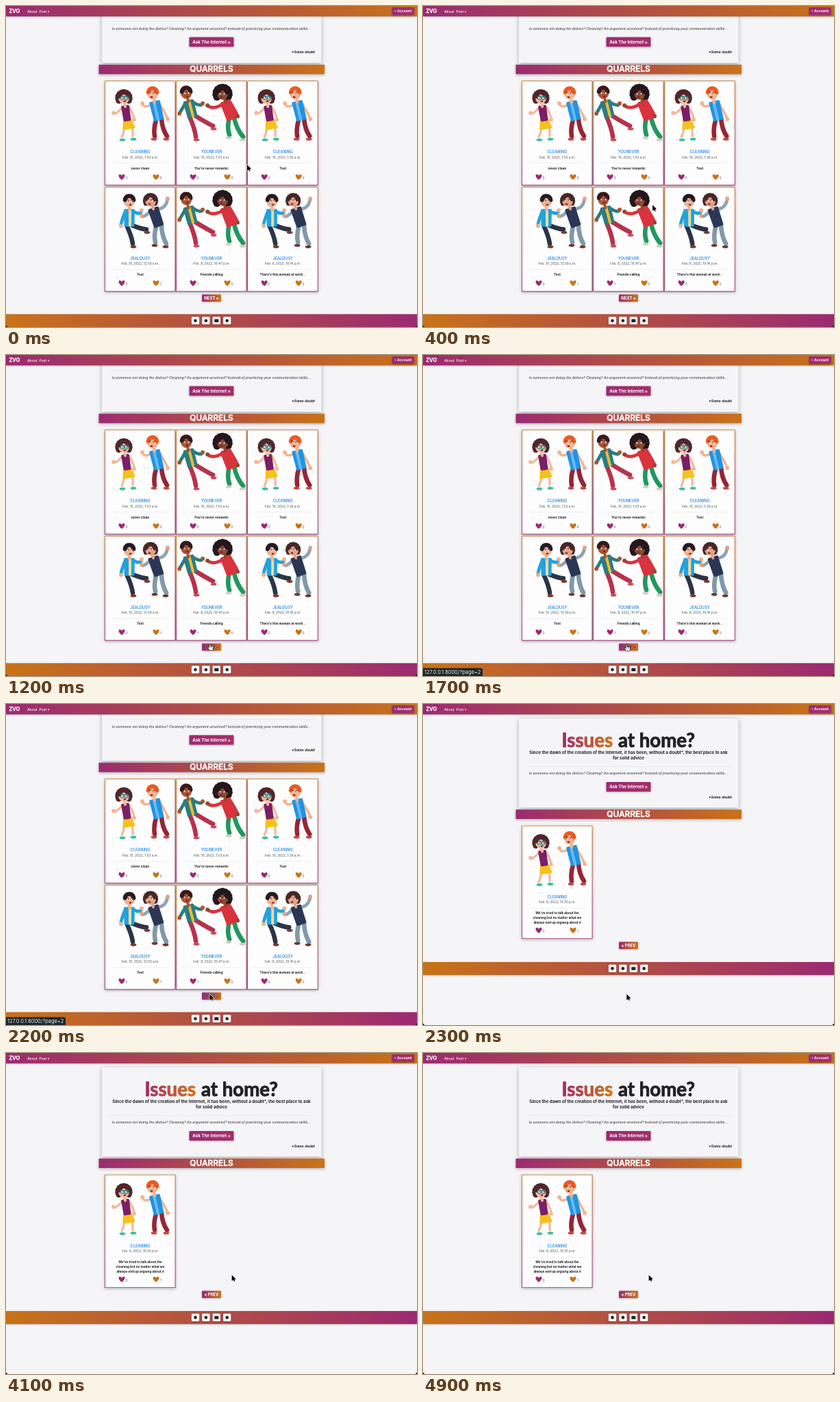
Recreate the animation shown at these times as an HTML page with a canvas. Size 600x469 px, loop 5 s.

```html
<!DOCTYPE html>
<html lang="en">
<head>
<meta charset="utf-8">
<title>Quarrels</title>
<style>
html, body { margin: 0; width: 100%; height: 100%; overflow: hidden; background: #f5f4f7; }
canvas { display: block; width: 600px; height: 469px; }
</style>
</head>
<body>
<canvas id="stage"></canvas>
<script>
const W = 600, H = 469, LOOP = 5000, STEP = 100;
const PURPLE = '#9b2a72', ORANGE = '#c87318', INK = '#212226', LINK = '#147fe6', GREY = '#62666c';
const SANS = 'Inter, "Open Sans", sans-serif';
const canvas = document.getElementById('stage');
const ctx = canvas.getContext('2d');
const dpr = window.devicePixelRatio || 1;
canvas.width = W * dpr;
canvas.height = H * dpr;

// Basic drawing
function text(str, x, y, font, color, align = 'center', family = SANS) {
  ctx.font = `${font} ${family}`;
  ctx.textAlign = align;
  ctx.fillStyle = color;
  ctx.fillText(str, x, y);
}

// Text with a round outline, for soft corners
function roundText(str, x, y, font, color, align, weight, family) {
  text(str, x, y, font, color, align, family);
  ctx.lineJoin = 'round';
  ctx.lineWidth = weight;
  ctx.strokeStyle = color;
  ctx.strokeText(str, x, y);
}

function fade(x0, y0, x1, y1, from = PURPLE, to = ORANGE) {
  const g = ctx.createLinearGradient(x0, y0, x1, y1);
  g.addColorStop(0, from);
  g.addColorStop(1, to);
  return g;
}

function box(x, y, w, h, fill, r = 0, shadow = 0) {
  ctx.save();
  if (shadow) {
    ctx.shadowColor = 'rgba(0,0,0,.3)';
    ctx.shadowBlur = shadow * dpr;
    ctx.shadowOffsetY = shadow * 0.3 * dpr;
  }
  ctx.fillStyle = fill;
  ctx.beginPath();
  ctx.roundRect(x, y, w, h, r);
  ctx.fill();
  ctx.restore();
}

function oval(color, [x, y], rx, ry = rx, turn = 0) {
  ctx.fillStyle = color;
  ctx.beginPath();
  ctx.ellipse(x, y, rx, ry, turn, 0, 7);
  ctx.fill();
}

function line(color, width, from, to, bend = from) {
  ctx.strokeStyle = color;
  ctx.lineWidth = width;
  ctx.lineCap = 'round';
  ctx.beginPath();
  ctx.moveTo(...from);
  ctx.quadraticCurveTo(...bend, ...to);
  ctx.stroke();
}

function shape(color, points, edge = 0) {
  ctx.fillStyle = ctx.strokeStyle = color;
  ctx.lineWidth = edge;
  ctx.lineJoin = 'round';
  ctx.beginPath();
  points.forEach(p => ctx.lineTo(...p));
  ctx.closePath();
  ctx.fill();
  if (edge) ctx.stroke();
}

function heart(x, y, color) {
  ctx.fillStyle = color;
  ctx.beginPath();
  for (const k of [-1, 1]) {
    ctx.moveTo(x, y - 2.2);
    ctx.bezierCurveTo(x + k * 3, y - 6.6, x + k * 8.4, y - 2.4, x, y + 4.2);
  }
  ctx.fill();
}

const mix = (a, b, u) => a.map((v, i) => v + (b[i] - v) * u);

// People: a spine from head to hip, with curved limbs to the hands and feet
function scowl([x, y], side) {
  for (const k of [-1, 1]) {
    const ex = x + k * 3 + side;
    oval('#fff', [ex, y], 1.5, 1.2);
    oval('#3a1c1a', [ex + side * 0.5, y], 0.7);
    line('#3a1c1a', 0.9, [ex - k * 1.4, y - 1.4], [ex + k * 1.8, y - 2.7]);
  }
  oval('#7d1f25', [x + side * 1.5, y + 5], 2, 1.1, -side * 0.2);
}

function curls(color, [x, y], reach, size, spread) {
  for (let i = 0; i <= 10; i++) {
    const a = Math.PI / 2 + (i / 5 - 1) * spread;
    oval(color, [x + reach * Math.cos(a), y - reach * Math.sin(a)], size);
  }
}

function person({ head, hip, hands, feet, side, skin, hair, mane = 0, top, inner, sleeve, legs, shoe, skirt, glasses }) {
  const dx = hip[0] - head[0], dy = hip[1] - head[1], len = Math.hypot(dx, dy);
  const spine = (down, out = 0) =>
    [head[0] + (dx * down + dy * out) / len, head[1] + (dy * down - dx * out) / len];

  if (mane) curls(hair, head, 4 + mane, mane, 2.1);
  feet.forEach((foot, i) => {
    const from = spine(len, i ? 4 : -4), knee = mix(from, foot, 0.5);
    knee[0] += side * 3;
    line(legs, skirt ? 3.2 : 6.6, from, [foot[0], foot[1] - 5], knee);
    oval(shoe, [foot[0] + side, foot[1] - 0.6], 4.4, 2.1);
  });
  if (skirt) shape(skirt, [spine(len - 2, -5), spine(len - 2, 5), spine(len + 13, 9), spine(len + 13, -8)], 1.5);

  hands.forEach((hand, i) => {
    const from = spine(15, i ? 6 : -6), elbow = mix(from, hand, 0.5);
    elbow[0] += i ? 5 : -4;
    elbow[1] += 7;
    line(sleeve || skin, sleeve ? 4.8 : 3.4, from, hand, elbow);
    oval(skin, hand, 2.9);
  });
  const half = skirt ? 4 : 6;
  shape(top, [spine(13, -half), spine(13, half), spine(len, half - 0.5), spine(len, 0.5 - half)], 4);
  if (inner) line(inner, 4, spine(13, side), spine(len, side));

  line(skin, 4, spine(5), spine(13));
  oval(skin, head, 7.9, 8.7, -Math.atan2(dx, dy));
  curls(hair, [head[0], head[1] - 1.5], 6.4, 3, 1.5);
  scowl(head, side);
  if (glasses) for (const k of [-3, 3]) {
    ctx.strokeStyle = glasses;
    ctx.lineWidth = 1.1;
    ctx.beginPath();
    ctx.arc(head[0] + side + k, head[1], 2.7, 0, 7);
    ctx.stroke();
  }
}

const cleaning = [
  { head: [28, 25], hip: [33, 57], hands: [[13, 47], [43, 57]], feet: [[25, 87], [41, 86]], side: 1,
    skin: '#f4b89c', hair: '#51272c', mane: 4.4, top: '#7b1f67', legs: '#f4b89c', shoe: '#3fbf9a',
    skirt: '#f6c11c', glasses: '#24959c' },
  { head: [70, 19], hip: [79, 56], hands: [[55, 33], [92, 56]], feet: [[73, 86], [91, 86]], side: -1,
    skin: '#f5b28e', hair: '#ea5b22', top: '#2094e4', inner: '#6db9ee', legs: '#962536', shoe: '#c9473f' }
];
const romance = [
  { head: [15, 18], hip: [24, 52], hands: [[5, 48], [39, 33]], feet: [[29, 87], [54, 71]], side: 1,
    skin: '#a85530', hair: '#38191d', top: '#2b7c83', inner: '#f1bb35', sleeve: '#2b7c83', legs: '#b7324c', shoe: '#c5505a' },
  { head: [68, 19], hip: [81, 55], hands: [[46, 36], [90, 52]], feet: [[78, 84], [98, 87]], side: -1,
    skin: '#8d4930', hair: '#25171d', mane: 5.4, top: '#d9333e', sleeve: '#d9333e', legs: '#20985c', shoe: '#d8c9c6' }
];
const jealousy = [
  { head: [36, 21], hip: [36, 56], hands: [[24, 57], [54, 34]], feet: [[41, 88], [61, 67]], side: 1,
    skin: '#f0b18f', hair: '#241b24', top: '#22a2dc', inner: '#f0d9a0', sleeve: '#22a2dc', legs: '#2c3445', shoe: '#7c3b2d' },
  { head: [67, 20], hip: [79, 56], hands: [[54, 42], [92, 17]], feet: [[74, 86], [90, 88]], side: -1,
    skin: '#e6a184', hair: '#47282a', mane: 3.6, top: '#2b3655', sleeve: '#8fa4b2', legs: '#7f99aa', shoe: '#70382e' }
];

// Page parts
const posts = [
  [cleaning, 'CLEANING', 'Feb. 10, 2022, 1:53 a.m.', ['never clean'], 0, 0],
  [romance, 'YOUNEVER', 'Feb. 10, 2022, 1:53 a.m.', ["You're never romantic"], 0, 0],
  [cleaning, 'CLEANING', 'Feb. 10, 2022, 1:36 a.m.', ['Test'], 0, 0],
  [jealousy, 'JEALOUSY', 'Feb. 10, 2022, 12:59 a.m.', ['Test'], 0, 1],
  [romance, 'YOUNEVER', 'Feb. 8, 2022, 10:47 p.m.', ['Friends calling'], 1, 0],
  [jealousy, 'JEALOUSY', 'Feb. 8, 2022, 10:41 p.m.', ["There's this woman at work..."], 0, 0]
];
const lastPost = [cleaning, 'CLEANING', 'Feb. 8, 2022, 10:35 p.m.',
  ["We've tried to talk about the", 'cleaning but no matter what we', 'always end up arguing about it'], 0, 1];

function card([people, title, date, lines, likes, hates], x, y) {
  const h = 153 + (lines.length - 1) * 6.2, cx = 52, hy = h - 12.3;
  ctx.save();
  ctx.translate(x, y);
  box(0, 0, 103.5, h, fade(30, 0, 60, h, ORANGE, PURPLE), 0.5, 4);
  box(0.9, 0.9, 101.7, h - 1.8, '#fdfdfe');
  people.forEach(person);
  text(title, cx, 106.2, '500 5.6px', LINK);
  text(date, cx, 113.7, '500 4.65px', GREY);
  box(8, 120.3, 87, 0.5, '#e4e4e8');
  lines.forEach((str, i) => text(str, cx, 129.3 + i * 6.9, '700 4.65px', INK));
  [[likes, PURPLE], [hates, ORANGE]].forEach(([count, color], i) => {
    heart(25 + i * 50, hy, color);
    text(count, 32 + i * 50, hy + 3, '400 5px', GREY);
  });
  ctx.restore();
}

function button(x, y, w, h) {
  box(x, y, w, h, fade(x, 0, x + w, 0, '#9c2a73', '#a52f69'), 1.2, 3);
}

function intro() {
  const title = '700 27.6px', lato = 'Lato, sans-serif';
  box(140, 21, 320.5, 130.5, '#f5f5f7', 1, 6);
  roundText('Issues', 202.5, 62.5, title, fade(203, 0, 280, 0, '#a32c6c', '#cd7b19'), 'left', 0.9, lato);
  roundText('at home?', 397, 62.5, title, INK, 'right', 0.9, lato);
  text('Since the dawn of the creation of the Internet, it has been, without a doubt*, the best place to ask',
    300, 73, '700 6.15px', INK);
  text('for solid advice', 300, 81.3, '700 6.15px', INK);
  box(150, 91, 300, 0.5, '#e2e2e6');
  text('Is someone not doing the dishes? Cleaning? An argument unsolved? Instead of practicing your communication skills...',
    300, 103, 'italic 600 5.08px', '#5b5d63');
  button(267.5, 114, 65, 14);
  text('Ask The Internet »', 300, 123.1, '700 6.2px', '#fff');
  text('*Some doubt', 451, 137.7, 'italic 700 5.2px', INK, 'right');
  box(135.5, 154.3, 329.5, 13.8, fade(135, 154, 465, 168), 0.5, 4);
  roundText('QUARRELS', 300, 164.9, '600 11.9px', '#fff', 'center', 0.4);
}

function pager(label, y, hover) {
  box(286, y, 28, 10.6, fade(288, y, 312, y + 8), 1, 2.5);
  text(label, 300, y + 7.6, '700 5.9px', hover ? '#44509f' : '#fff');
}

function footer(y) {
  box(0, y, W, 19, fade(0, y, W, y + 19, ORANGE, PURPLE), 0, 3);
  for (let i = 0; i < 4; i++) {
    const x = 276.5 + i * 15.4, cy = y + 9.4;
    box(x - 5.7, cy - 5.6, 11.4, 11.2, '#f8f7f8', 1.4, 2.5);
    if (i === 2) box(x - 3, cy - 2.2, 6, 4.6, INK, 0.6);
    else oval(INK, [x, cy], 2.3);
  }
}

function navbar() {
  box(0, 0, W, 15.2, fade(0, 0, W, 15), 0, 3);
  roundText('ZVO', 4.5, 10.3, '600 7.4px', '#fff', 'left', 0.3);
  text('About', 31, 9.6, '500 5px', '#fff', 'left');
  text('Post »', 48.5, 9.6, '500 5px', '#fff', 'left');
  button(563.5, 2, 32.5, 11);
  text('‹', 568.2, 9.3, '700 5.2px', '#fff');
  text('Account', 592, 9.4, '700 5.1px', '#fff', 'right');
}

function statusBar() {
  box(0, 457.5, 87, 12, '#1a272b', [0, 2, 0, 0]);
  text('127.0.0.1:8000/?page=2', 2, 466.4, '400 7.4px', '#eef2f3', 'left');
}

// Pointers: each is drawn wide for the outline, then again on top
function arrow() {
  for (const [color, edge] of [['#fff', 1.2], ['#050505', 0.1]]) {
    shape(color, [[0, 0], [0, 8.2], [5.8, 5.7]], edge);
    line(color, 1.4 + edge, [2.4, 5.5], [3.8, 8.6]);
  }
}

function hand() {
  for (const [color, edge] of [['#111', 1.1], ['#fff', 0]]) {
    for (let i = 0; i < 4; i++) line(color, 1.2 + edge, [i * 1.4, i ? 3 : 0.6], [i * 1.3, 6]);
    line(color, 1.2 + edge, [-2.2, 4.6], [0, 7]);
    line(color, 2.4 + edge, [0.8, 7], [3.4, 7]);
  }
}

const ease = (t, from, to) => {
  const u = Math.min(1, Math.max(0, (t - from) / (to - from)));
  return u * u * (3 - 2 * u);
};

function pointerAt(t) {
  const nearLink = mix([352, 232], [298.5, 418], ease(t, 100, 900));
  const onLink = mix(nearLink, [297.3, 424], ease(t, 900, 1300));
  return mix(onLink, [329.7, 324.5], ease(t, 2400, 3000));
}

function draw(t) {
  const second = t >= 2300, hover = t >= 1200 && !second;
  ctx.setTransform(dpr, 0, 0, dpr, 0, 0);
  box(0, 0, W, H, '#f5f4f7');
  ctx.save();
  if (!second) ctx.translate(0, -68.5);
  intro();
  if (second) {
    card(lastPost, 144, 177.7);
    pager('« PREV', 347.5, false);
    footer(377);
  } else {
    posts.forEach((post, i) => card(post, 144 + (i % 3) * 104.1, 177.7 + Math.floor(i / 3) * 155.2));
    pager('NEXT »', 490, hover);
    footer(518.8);
  }
  ctx.restore();
  navbar();
  if (t >= 1300 && !second) statusBar();
  for (const [x, k] of [[0, 2.5], [W, -2.5]]) shape('#0a0a0a', [[x, H], [x + k, H], [x, H - 2.5]]);
  ctx.translate(...pointerAt(t));
  if (hover && t < 2000) hand();
  else arrow();
}

let shown = -1;
function tick() {
  const t = Math.floor(performance.now() % LOOP / STEP) * STEP;
  if (t !== shown) draw(shown = t);
  requestAnimationFrame(tick);
}
tick();
</script>
</body>
</html>
```
